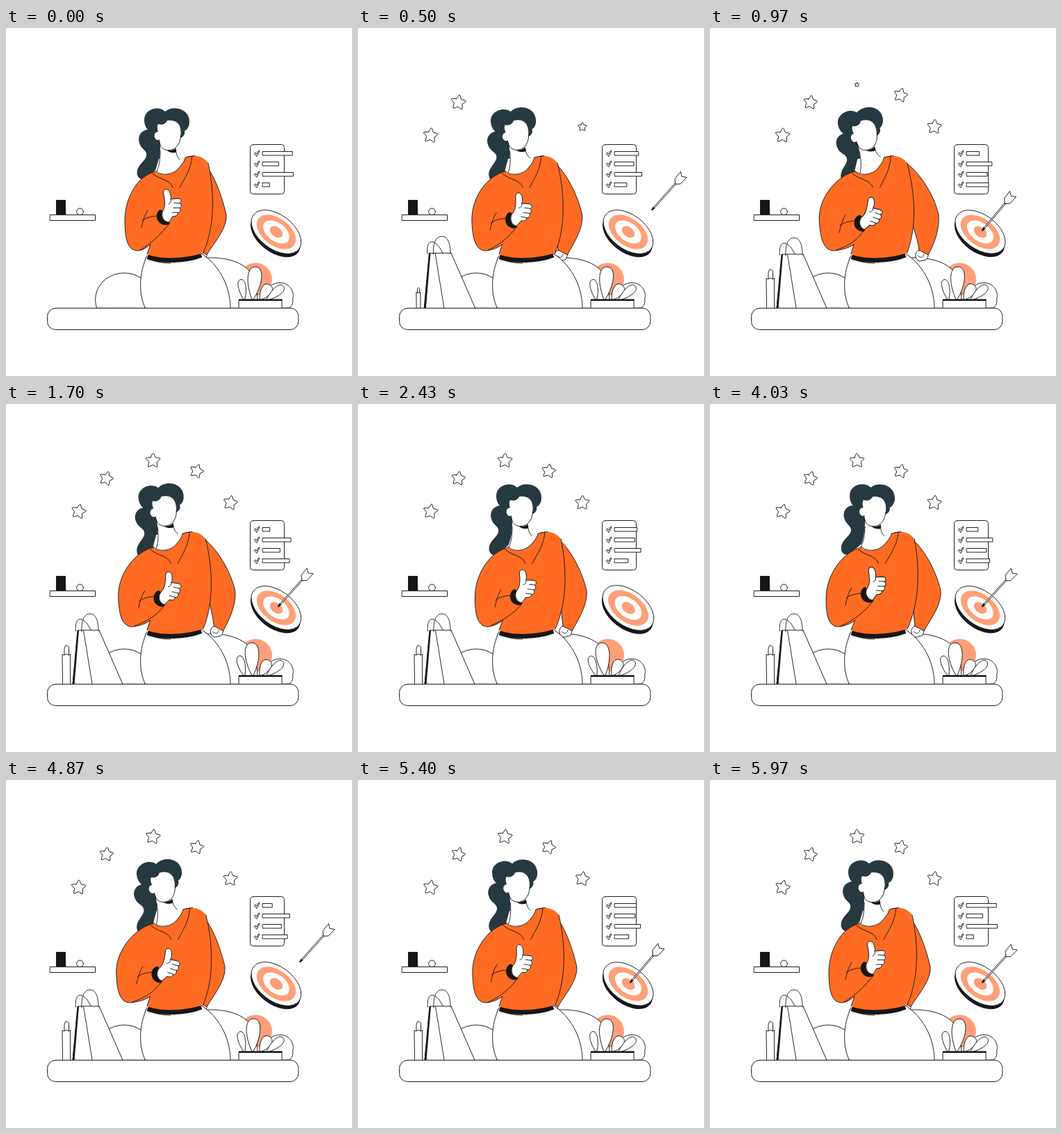
These frames come from a looping animation (498 px wide and 500 px high, 6010 ms). An HTML page:

```html
<!DOCTYPE html>
<html lang="en">
<head>
<meta charset="utf-8">
<title>Thumbs up</title>
<style>
html, body { margin: 0; width: 100%; height: 100%; overflow: hidden; background: #fff; }
svg { display: block; width: 498px; height: 500px; }
svg * { vector-effect: non-scaling-stroke; }
.o { fill: #fff; stroke: #151515; stroke-width: .95; stroke-linejoin: round; stroke-linecap: round; }
.l { fill: none; stroke: #151515; stroke-width: .9; stroke-linecap: round; }
.k { fill: #161616; }
.s { fill: #ff6b23; }
.h { fill: #263840; }
.p { fill: #ff9f78; }
</style>
</head>
<body>
<svg viewBox="0 0 498 500">
  <!-- shelf -->
  <rect class="o" x="63.5" y="268.5" width="65" height="8"/>
  <path class="k" d="M72 247H86V268H72Z"/>
  <circle class="o" cx="106.5" cy="263.8" r="4.8"/>

  <!-- bushes -->
  <path class="o" d="M130.500 402C122 376 143 352 170 352C182 352 191 356 200 364V402Z"/>
  <circle class="p" cx="359.500" cy="361" r="23.500"/>
  <path class="o" d="M280 402V331C300 328 336 331 351 350C360 360 362 375 362 402Z"/>
  <path class="o" d="M372 402C366 385 376 366 395 366C408 367 416 378 412.500 390C414 395 411 400 408 402Z"/>

  <g id="plant"></g>
  <rect class="o" x="335.500" y="390.500" width="61.500" height="12"/>
  <rect class="k" x="335" y="389.500" width="62.500" height="2.500"/>

  <g id="list"><rect class="o" x="351.500" y="167.500" width="49" height="71" rx="4"/></g>

  <g id="target">
    <g transform="rotate(37)">
      <ellipse class="k" cx="2" cy="4.500" rx="41" ry="24.500"/>
      <ellipse class="o" rx="41" ry="24.500"/>
      <ellipse class="p" rx="32" ry="19.500"/>
      <ellipse fill="#fff" rx="21.500" ry="13"/>
      <ellipse class="p" rx="10.500" ry="7"/>
    </g>
  </g>
  <g id="arrow">
    <path class="o" d="M2 -.9H53V.9H2Z"/>
    <path class="k" d="M0 0L6 -2V2Z"/>
    <path class="o" d="M52 0L57 -5.500L70 -6L66 0L70 6L57 5.500Z"/>
  </g>

  <g id="candle">
    <path class="o" d="M84 360V352C84 345 90.500 345 90.500 352V360"/>
    <path class="o" d="M81.500 402.500L81 359.500L83.500 361L87 359L90 361L92.500 359.500V402.500Z"/>
  </g>
  <g id="bag">
    <path class="l" d="M100.500 326C99 316 102 309 107 309C113 310 119 317 123 327"/>
    <path class="o" d="M104 325H134L168 402.500H96.500Z"/>
    <path class="l" d="M111.500 325L124 402M109 327C108 310 113 301.500 121 301.500C129 301.500 133 311 133 326"/>
    <path class="k" d="M102.500 325H105L98.500 402.500H95.500Z"/>
  </g>

  <g id="stars"></g>

  <!-- figure -->
  <g id="palm">
    <path class="o" d="M-8 -5C-14 0 -11 9 -5 10L4 8C8 4 8 -3 6 -6Z"/>
    <path class="l" d="M-8 2C-4 6 0 5 1 0"/>
  </g>
  <path id="arm" class="s" stroke="#151515" stroke-width=".9"/>
  <path class="o" d="M202.500 328C192 352 190 380 200.500 402.500H323C323 368 304 338 281 324Z"/>
  <path class="l" d="M204 331C214 336 226 338 237 338"/>
  <path d="M204 328.500C222 335.500 258 335 281 326" fill="none" stroke="#161616" stroke-width="7.500"/>
  <g id="hair">
    <path class="h" d="M229 120C220 111 199 116 199 132C199 138 201 143 204 146C194 147 189 156 192 165C194 174 204 176 202 184C200 192 189 196 188.500 208C189 216 195 219 200 216C206 211 216 205 222 196L236 176L251 158C256 156 258 152 257 148C264 145 266 134 262 126C256 114 238 112 229 120Z"/>
  </g>
  <path id="chest" fill="#fff"/>
  <g id="head">
    <path fill="#fff" d="M222 168C222 184 220 196 216 208H250L246 186L244 170Z"/>
    <path class="l" d="M222 176C222 188 221 197 217 206M244.500 175C245 181 246 185 250 189"/>
    <path class="k" d="M231 175.500C237 177 242 175 245 172.500L245 178.500C241 180 235 179 231 175.500Z"/>
    <path fill="#fff" d="M219 149C214 149 212 155 215 159C217 162 220 161 221 160C221 171 227 176 235 175.500C246 175 252 162 251.500 148C251 136 243 131.500 232 133C230 138 224 140 219 138C217 142 218 146 219 149Z"/>
    <path class="l" d="M221 164C222 173 228 176 235 175.500C245 175 251 165 251.500 155"/>
  </g>
  <path id="torso" class="s"/>
  <path id="folds" class="l"/>
  <g id="hand">
    <path class="k" d="M0 -9C-6 -6 -7 4 -1 10C3 13 8 14 13 12L14 9C6 10 -1 2 4 -7Z"/>
    <path class="o" d="M3 -6C8 -13 7 -21 4.500 -33C4 -40 12 -40 14 -33C15.500 -28 15.500 -26 15 -24L25 -25C31 -25 31 -20 28 -18.500C31 -17 31 -12 28 -11.500C30 -9 29 -5 25 -4.500C26 -1 22 1 18 0.500C16 4 14 7 12.500 9C6 9 1 2 3 -6Z"/>
    <path class="l" d="M20 -18.500H28M19 -11.500H28M17 -5H25M15 -24C16 -21 15 -18 12 -17"/>
  </g>

  <rect class="o" x="59.500" y="402.500" width="361.500" height="31" rx="12"/>
</svg>
<script>
const LOOP = 6010, NS = 'http://www.w3.org/2000/svg';
const $ = id => document.getElementById(id);
const put = (el, name, value) => el.setAttribute(name, value);
const clamp = v => Math.max(0, Math.min(1, v));
const span = (t, start, length) => clamp((t - start) / length);
const wave = (t, period) => Math.cos(2 * Math.PI * t / period);

function add(parent, tag, attrs) {
  const el = document.createElementNS(NS, tag);
  for (const k in attrs) put(el, k, attrs[k]);
  return parent.appendChild(el);
}

function backOut(p) {
  const q = p - 1;
  return 1 + 2.7 * q * q * q + 1.7 * q * q;
}

function popAt(el, x, y, scale, turn = 0) {
  put(el, 'transform', `translate(${x} ${y}) rotate(${turn}) scale(${scale}) translate(${-x} ${-y})`);
  el.style.display = scale > 0.01 ? '' : 'none';
}

// Time, head tilt, torso lean, elbow, cuff x, cuff y, hand turn, far elbow, far wrist
const poses = [
  [0, 0, 0, 0, 0, 0, 0, 317, 282],
  [970, -11, -7, -11, -9, 7, 18, 329, 307],
  [2430, 0, 1, -3, 2, 5, 7, 329, 301],
  [3370, -3, 0, -2, 3, 6, 12, 331, 306],
  [4030, 1.5, 3, -5, 0, 2, 3, 332, 301],
  [4870, -8, -3, -11, -7, 6, 18, 315, 282],
  [5970, 0, 0, 0, 0, 0, 0, 317, 282],
  [LOOP, 0, 0, 0, 0, 0, 0, 317, 282]
];

function slope(i, k) {
  const a = poses[i - 1], b = poses[i + 1];
  return a && b && i < poses.length - 2 ? (b[k] - a[k]) / (b[0] - a[0]) : 0;
}

function poseAt(t) {
  let i = 0;
  while (poses[i + 2] && t >= poses[i + 1][0]) i++;
  const a = poses[i], b = poses[i + 1], d = b[0] - a[0], u = (t - a[0]) / d;
  const ease = u * u * (3 - 2 * u);
  return a.slice(1).map((v, j) => v + (b[j + 1] - v) * ease
    + d * u * (1 - u) * ((1 - u) * slope(i, j + 1) - u * slope(i + 1, j + 1)));
}

// Leans every "x,y" pair around the hem
const leaned = (d, lean) => d.replace(/(-?[\d.]+),(-?[\d.]+)/g,
  (_, x, y) => `${(+x + lean * (328 - y) / 128).toFixed(2)},${y}`);

function drawFigure(t) {
  const [tilt, lean, e, cx, cy, turn, far, wrist] = poseAt(t);
  put($('hair'), 'transform', `rotate(${tilt} 228 212)`);
  put($('head'), 'transform', `rotate(${tilt} 228 212)`);
  put($('palm'), 'transform', `translate(${wrist} 325)`);
  put($('arm'), 'd', `M${262 + lean} 185C${286 + lean} 178 ${far - 10} 225 ${far} 268` +
    `C${far + 2} 288 ${wrist + 16} 310 ${wrist + 7} 326L${wrist - 6} 319` +
    `C${wrist - 9} 295 ${291 + lean / 2} 280 ${291 + lean / 2} 255Z`);
  put($('hand'), 'transform', `translate(${222 + cx} ${270 + cy}) rotate(${turn})`);

  const a = turn * Math.PI / 180, c = Math.cos(a), s = Math.sin(a);
  const low = [222 + cx + 12 * c - 12 * s, 270 + cy + 12 * s + 12 * c];
  const wristUp = [217 + cx, 270 + cy];

  const neck = 'C222,213 240,212 249,201 C254,195 257,191 258,186';
  put($('chest'), 'd', leaned(`M215,205 ${neck} L246,185 L220,188Z`, lean));
  const sleeve = `M215,206 C190,212 ${171 + e},243 ${171 + e},277 ` +
    `C${171 + e},305 ${176 + e},320 ${190 + e},320 C${198 + e * .7},319 203,315 208,311`;
  const side = 'C300,235 301,285 284,323';
  put($('torso'), 'd', leaned(`${sleeve} L203,325 C222,333 258,332 284,323 ` +
    `C301,285 300,235 291,194 C283,183 270,182 258,186 C257,191 254,195 249,201 C240,212 222,213 215,206Z`, lean));
  put($('folds'), 'd', leaned(`${sleeve} M208,311 L203,325 M291,194 ${side} ` +
    `M215,205 ${neck} C262,185 267,184 272,183.5 ` +
    'M211,209 C222,219 236,217 240,229 M268,184 C266,204 258,214 250,229', lean) +
    `M${low}C${low[0] - 9} ${low[1] + 12} ${208 + cx / 2} 311 ${193 + e} 319` +
    `M${wristUp}C${wristUp[0] - 8} ${wristUp[1] + 1} ${202 + cx} ${272 + cy} ${196 + cx} ${277 + cy}` +
    `M${204 + cx} ${262 + cy}C${199 + cx} ${269 + cy} ${197 + cx} ${278 + cy} ${195 + cx} ${287 + cy}`);
}

// Bars: top, mean right end, swing
const bars = [[177.5, 395.3, 17], [192.5, 401.7, -9.2], [207.5, 403.5, 10], [222.5, 394.3, -15]]
  .map(([y, mean, swing]) => {
    add($('list'), 'path', { class: 'o', d: `M357.500 ${y + 2.5}l1.500-1 1.700 2.300 2.800-5.300 1.500 .8-4 7.500z` });
    const el = add($('list'), 'rect', { class: 'o', x: 369.5, y, height: 5.5 });
    return { el, mean, swing };
  });

// Leaves: base x, height, half width, middle angle, swing
const leaves = [[343, 29, 7, -14, 4], [355, 47, 13, -.5, 6], [366, 25, 10, 31, 3], [376, 30, 8, 49, 2]]
  .map(([x, h, w, angle, swing]) => {
    const el = add($('plant'), 'path', {
      class: 'o',
      d: `M-1 0C${-w} ${-h * .5} ${-w} ${-h} 0 ${-h}C${w} ${-h} ${w} ${-h * .5} 1 0Z`
    });
    return { el, x, angle, swing };
  });

function starPath(r) {
  const at = (k, m) => {
    const a = Math.PI * k / 5 - Math.PI / 2;
    return [m * Math.cos(a), m * Math.sin(a)];
  };
  let d = '';
  for (let k = 0; k < 10; k += 2) {
    const tip = at(k, r * 1.08), a = at(k - 1, r * .54), b = at(k + 1, r * .54);
    const mix = p => p.map((v, i) => v + (tip[i] - v) * .72);
    d += `${k ? 'L' : 'M'}${a}L${mix(a)}Q${tip} ${mix(b)}L${b}`;
  }
  return d + 'Z';
}

// Stars: x, y, radius, first moment, base turn
const stars = [[104.5, 154.5, 11, 100, 8], [144.5, 107, 10.5, 300, 12], [211.5, 81.5, 11, 940, 4],
  [274.5, 96.5, 10.5, 540, 14], [323, 142, 10.8, 430, 6]]
  .map(([x, y, r, start, turn]) => ({ el: add($('stars'), 'path', { class: 'o', d: starPath(r) }), x, y, start, turn }));

// Shots: appears, starts flying, vanishes
const shots = [[320, 570, 2120], [2540, 2760, 4520], [4760, 5010, LOOP]];

function drawArrow(t) {
  const shot = shots.find(s => t >= s[0] && t < s[2]);
  $('arrow').style.display = shot ? '' : 'none';
  if (!shot) return 0;
  const p = span(t, shot[1], 240), fly = p * p;
  const since = t - shot[1] - 240;
  const shake = since > 0 ? Math.exp(-since / 260) * Math.sin(since / 38) : 0;
  put($('arrow'), 'transform',
    `translate(${422 - 31 * fly} ${262.5 + 29.5 * fly}) rotate(${-48 + shake * 4})`);
  put($('arrow'), 'opacity', span(t, shot[0], 80));
  return shake;
}

function draw(t) {
  drawFigure(t);
  for (const b of bars) put(b.el, 'width', b.mean + b.swing * wave(t, 3000) - 369.5);
  for (const l of leaves)
    put(l.el, 'transform', `translate(${l.x} 390) rotate(${l.angle + l.swing * wave(t, 6000)})`);
  for (const s of stars) {
    const size = backOut(span(t, s.start, 430));
    s.el.style.display = size > .01 ? '' : 'none';
    put(s.el, 'transform', `translate(${s.x} ${s.y}) rotate(${s.turn + 5 * wave(t + s.start, 2000)}) scale(${size})`);
  }
  popAt($('bag'), 132, 402.5, backOut(span(t, 80, 480)));
  popAt($('candle'), 87, 402.5, backOut(span(t, 440, 450)));
  const shake = drawArrow(t);
  const swell = 1 + .03 * Math.sin(Math.PI * span(t, 2200, 440));
  put($('target'), 'transform', `translate(389 293) rotate(${shake * 2}) scale(${swell})`);
}

const begin = performance.now();
function tick() {
  draw((performance.now() - begin) % LOOP);
  requestAnimationFrame(tick);
}
draw(0);
requestAnimationFrame(tick);
</script>
</body>
</html>
```
